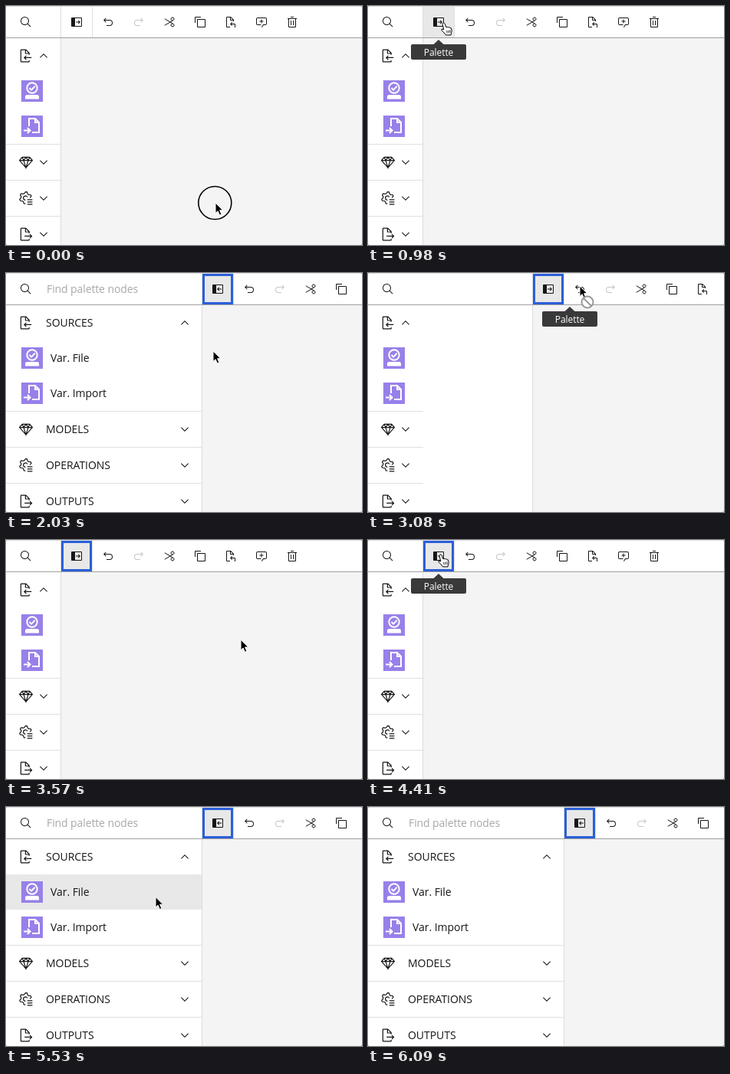
An HTML page for the animation above (6580 ms loop, 464x312 px).

```html
<!DOCTYPE html>
<html lang="en">
<head>
<meta charset="utf-8">
<title>Palette toggle</title>
<style>
  html, body { margin: 0; height: 100%; overflow: hidden; background: #999; }
  svg { display: block; width: 464px; height: 312px; border-radius: 3px; background: #fff; }
  text { font: 14px "Open Sans", "Noto Sans", sans-serif; letter-spacing: -.05px; fill: #161616; }
  path { fill-rule: evenodd; }
  .line { fill: none; stroke: #161616; stroke-width: 2; }
  .white { fill: none; stroke: #fff; stroke-width: 2; }
</style>
</head>
<body>
<svg id="stage" viewBox="0 0 464 312"></svg>
<script>
const LOOP = 6580, STEP = 70, SLIDE = 400;
const OPEN1 = 1070, CLOSE = 2958, OPEN2 = 4520, FOCUS = 1050;
const NARROW = 72, WIDE = 256;

// Icons on a 32 unit grid
const DOC = 'M24 14V10a1 1 0 0 0-.29-.71l-7-7A1 1 0 0 0 16 2H6A2 2 0 0 0 4 4V28a2 2 0 0 0 2 2H22a2 2 0 0 0 2-2V26H22v2H6V4h8v6a2 2 0 0 0 2 2h6v2Zm-8-4V4.41L21.59 10Z';
const PANEL = 'M28 4H4A2 2 0 0 0 2 6V26a2 2 0 0 0 2 2H28a2 2 0 0 0 2-2V6a2 2 0 0 0-2-2Zm0 22H12V6H28Z';
const ICON = {
  search: 'M29 27.6l-7.55-7.55a11 11 0 1 0-1.41 1.41L27.6 29ZM4 13a9 9 0 1 1 9 9A9 9 0 0 1 4 13Z',
  expand: PANEL + 'M14 15H22.2L19.6 12.4 21 11l5 5-5 5-1.4-1.4L22.2 17H14z',
  collapse: PANEL + 'M26 15H17.8l2.6-2.6L19 11l-5 5 5 5 1.4-1.4L17.8 17H26z',
  undo: 'M20 10H7.8l3.6-3.6L10 5 4 11l6 6 1.4-1.4L7.8 12H20a6 6 0 0 1 0 12H12v2h8a8 8 0 0 0 0-16Z',
  redo: 'M12 10H24.2l-3.6-3.6L22 5l6 6-6 6-1.4-1.4L24.2 12H12a6 6 0 0 0 0 12H20v2H12a8 8 0 0 1 0-16Z',
  cut: 'M3.5 7.5 24 19.4M3.5 24.5 24 12.6M24 4a4 4 0 1 0 .1 0ZM24 20a4 4 0 1 0 .1 0Z',
  copy: 'M9 9H29V29H9ZM3 18V3H18',
  paste: 'M26 20H17.8l2.6-2.6L19 16l-5 5 5 5 1.4-1.4L17.8 22H26v8h2V22a2 2 0 0 0-2-2ZM23.7 9.3l-7-7A1 1 0 0 0 16 2H6A2 2 0 0 0 4 4V28a2 2 0 0 0 2 2h8V28H6V4h8v6a2 2 0 0 0 2 2h6v2h2V10a1 1 0 0 0-.3-.7ZM16 4.4 21.6 10H16Z',
  comment: 'M17.7 30 16 29l4-7h6a2 2 0 0 0 2-2V8a2 2 0 0 0-2-2H6A2 2 0 0 0 4 8V20a2 2 0 0 0 2 2h9v2H6a4 4 0 0 1-4-4V8A4 4 0 0 1 6 4H26a4 4 0 0 1 4 4V20a4 4 0 0 1-4 4H21.2ZM17 9h-2v4h-4v2h4v4h2v-4h4v-2h-4z',
  trash: 'M12 12H14V24H12ZM18 12H20V24H18ZM4 6V8H6V28a2 2 0 0 0 2 2H24a2 2 0 0 0 2-2V8h2V6ZM8 28V8H24V28ZM12 2H20V4H12Z',
  input: DOC + 'M28 19H14.8l2.6-2.6L16 15l-5 5 5 5 1.4-1.4L14.8 21H28z',
  output: DOC + 'M13 21H26.2l-2.6 2.6L25 25l5-5-5-5-1.4 1.4L26.2 19H13z',
  gem: 'M8 5H24L30 12 16 28 2 12ZM2 12H30M8 5 11 12 16 28 21 12 24 5M11 12 16 5 21 12',
  gear: gearPath() + 'M19 13.5A4.5 4.5 0 1 0 15 20M19 19H30M19 24H30M19 29H30',
  up: 'M16 10 26 20 24.6 21.4 16 12.8 7.4 21.4 6 20Z',
  down: 'M16 22 6 12 7.4 10.6 16 19.2 24.6 10.6 26 12Z'
};

// Open outline of a six-toothed wheel, leaving room for the list lines
function gearPath() {
  let d = '';
  for (let i = 0; i < 19; i++) {
    const a = (90 + i * 15) * Math.PI / 180, r = i % 4 < 2 ? 13 : 9.6;
    d += (i ? 'L' : 'M') + (15 + r * Math.cos(a)).toFixed(1) + ' ' + (15 + r * Math.sin(a)).toFixed(1);
  }
  return d;
}

const icon = (name, x, y, size = .5, attrs = 'fill="#161616"') =>
  `<path d="${ICON[name]}" transform="translate(${x} ${y}) scale(${size}) translate(-16 -16)" ${attrs}/>`;
const rect = (x, y, w, h, fill, attrs = '') =>
  `<rect x="${x}" y="${y}" width="${w}" height="${h}" fill="${fill}" ${attrs}/>`;
const label = (x, y, s) => `<text x="${x}" y="${y}">${s}</text>`;
const LINE = 'class="line"';

const groups = [['SOURCES', 65, 'up'], ['MODELS', 204, 'down'], ['OPERATIONS', 251, 'down'], ['OUTPUTS', 298, 'down']];
const dividers = w => [180, 227, 274].map(y => rect(0, y, w, 1, '#e0e0e0')).join('');
const chevrons = x => groups.map(([, y, way]) => icon(way, x, y)).join('');

const paletteIcons =
  icon('search', 26, 21) + icon('input', 26, 65, .6) + icon('gem', 26, 204, .6, LINE) +
  icon('gear', 26, 251, .6, LINE) + icon('output', 26, 298, .6) +
  rect(20, 97, 28, 28, '#9880ea') + rect(20, 143, 28, 28, '#9880ea') +
  `<circle cx="34" cy="107" r="6.7" class="white"/><path d="M30.5 107l2.6 2.6 4.6-4.8" class="white"/>
   <path d="M25 121.5v-3q0-2.5 2.5-2.5h13q2.5 0 2.5 2.5v3z" fill="#fff"/>
   <path d="M30 157V147h8l5 5v13h-9M38 147v5h5" class="white" stroke-width="2.4"/>
   <path d="M23 162.5h8M28 159l3.5 3.5-3.5 3.5" class="white"/>`;

const tools =
  rect(0, 0, 400, 41, '#fff') + rect(40, 0, 1, 41, '#e0e0e0') +
  rect(0, 1, 40, 40, '#e8e8e8', 'id="shade"') +
  `<g id="expand">${icon('expand', 20, 21)}</g><g id="collapse">${icon('collapse', 20, 21)}</g>` +
  rect(1.5, 2.5, 37, 37, 'none', 'id="focus" stroke="#2a5fd8" stroke-width="3"') +
  icon('undo', 61, 21) + icon('redo', 101, 21, .5, 'fill="#c6c6c6"') +
  icon('cut', 141, 21, .5, LINE) + icon('copy', 181, 21, .5, LINE) + icon('paste', 221, 21) +
  icon('comment', 261, 21) + icon('trash', 301, 21);

const OUTLINE = 'stroke-width="1" stroke-linejoin="round"';
const cursors =
  `<path id="arrow" d="M0 0V13.5L3.1 10.7 5.4 16 7.9 14.9 5.6 9.7H9.8Z" fill="#000" stroke="#fff" ${OUTLINE}/>
   <g id="hand"><path d="M-2 1.5a1.6 1.6 0 0 1 3-.6l2 5 1.2-.6 1.4.6 1.3-.3 1.2 1 1.2.2.9 3.5-.6 2.4-.6 3.2H2.5L-.8 11.8-3.2 9.6l.6-1.6 2.4.8z" fill="#fff" stroke="#000" ${OUTLINE}/>
   <path d="M3.6 10l.6 3.4M5.8 9.6l.5 3.4M7.8 9.4l.4 3.2" stroke="#000" stroke-width=".8"/></g>
   <g id="beam" fill="none"><path d="M-3-7Q0-7 0-5V5Q0 7-3 7M3-7Q0-7 0-5M0 5Q0 7 3 7" stroke="#fff" stroke-width="3"/>
   <path d="M-3-7Q0-7 0-5V5Q0 7-3 7M3-7Q0-7 0-5M0 5Q0 7 3 7M-1.5 2H1.5" stroke="#000" stroke-width="1.3"/></g>
   <g id="barred" stroke="#999" stroke-width="2"><circle cx="10" cy="21" r="7.5" fill="#fff"/><path d="M4.8 15.8 15.2 26.2"/></g>
   <circle id="ring" cx="-.7" cy="0" r="21.5" fill="none" stroke="#000" stroke-width="1.6"/>`;

const byId = id => document.getElementById(id);
byId('stage').innerHTML =
  `<clipPath id="clip"><rect id="clipBox" height="312"/></clipPath>` +
  rect(0, 41, 464, 271, '#f4f4f4') +
  `<g clip-path="url(#clip)">${rect(0, 0, 256, 312, '#fff')}${rect(0, 0, 255, 46, '#e8e8e8', 'id="hover"')}
    ${paletteIcons}
    <g id="narrow">${dividers(NARROW)}${chevrons(49)}</g>
    <g id="wide">${dividers(WIDE)}${chevrons(233)}
      <text x="53" y="26" style="fill:#a8a8a8;letter-spacing:-.1px">Find palette nodes</text>
      ${groups.map(([s, y]) => label(52, y + 5, s)).join('')}
      ${label(58, 116, 'Var. File')}${label(58, 162, 'Var. Import')}</g>
  </g>
  <g id="tools">${tools}${rect(-1, 0, 1, 312, '#dcdcdc')}</g>` +
  rect(0, 41, 464, 1, '#a0a0a0') + rect(0, 0, 464, 1, '#e0e0e0') +
  `<g id="tip">${rect(-36, 50, 72, 20, '#393939', 'rx="2"')}<path d="M0 44 7 50.5H-7Z" fill="#393939"/>
    <text y="64.5" text-anchor="middle" style="font-size:12px;fill:#fff">Palette</text></g>
  <g id="cursor">${cursors}</g>`;

const el = {};
document.querySelectorAll('svg [id]').forEach(e => el[e.id] = e);
const show = (id, on) => el[id].style.display = on ? '' : 'none';
const place = (id, x, y) => el[id].setAttribute('transform', `translate(${x} ${y})`);

// Pointer path: time, x, y
const path = [
  [0, 273, 257], [350, 150, 190], [560, 30, 80], [700, 88, 42], [840, 99, 22], [980, 99, 22], [1470, 96, 20],
  [1610, 96, 20], [1820, 150, 80], [2030, 270, 102], [2170, 290, 70], [2310, 280, 24], [2450, 276, 17],
  [3360, 276, 17], [3640, 316, 168], [3850, 220, 110], [4060, 102, 30], [4410, 95, 19], [5040, 96, 20],
  [5250, 96, 20], [5460, 150, 90], [5740, 330, 200], [5950, 326, 274], [6020, 303, 296], [LOOP, 303, 296]
];
function pointer(t) {
  const i = path.findIndex(k => k[0] > t), [t0, x0, y0] = path[i - 1], [t1, x1, y1] = path[i];
  const u = (t - t0) / (t1 - t0);
  return [x0 + (x1 - x0) * u, y0 + (y1 - y0) * u];
}

function slide(t) {
  const u = Math.min(1, Math.max(0, t / SLIDE));
  return u * u * (3 - 2 * u);
}
function paletteWidth(t) {
  const p = t < CLOSE ? slide(t - OPEN1) : t < OPEN2 ? 1 - slide(t - CLOSE) : slide(t - OPEN2);
  return Math.round(NARROW + (WIDE - NARROW) * p);
}

function draw(t) {
  const w = paletteWidth(t), [x, y] = pointer(t);
  const wide = t >= OPEN1 && t < CLOSE || t >= OPEN2;
  const moving = w > NARROW && w < WIDE, opening = moving && wide, closing = moving && !wide;
  const over = !moving && y < 41 && x >= w && x < w + 40;
  const focused = t >= FOCUS;

  el.clipBox.setAttribute('width', w);
  place('tools', w, 0);
  show('wide', wide);
  show('narrow', !wide);
  show('collapse', wide);
  show('expand', !wide);
  show('focus', focused);
  show('shade', focused || over);

  const rowTop = [42, 88, 134, 181, 228, 275].filter(top => top <= y).pop();
  show('hover', w === WIDE && x < 255 && rowTop);
  if (rowTop) el.hover.setAttribute('y', rowTop);

  show('tip', over || opening || closing && t < CLOSE + 240);
  place('tip', opening ? NARROW + 20 : paletteWidth(closing ? t - 57 : t) + 20, 0);

  const kind = over || opening ? 'hand' : w === WIDE && x < w && y < 41 ? 'beam' : 'arrow';
  for (const k of ['arrow', 'hand', 'beam']) show(k, k === kind);
  show('barred', closing && t > 3060 && t < 3290);
  show('ring', t < STEP);
  show('cursor', t < 6090);
  place('cursor', x, y);
}

const start = performance.now();
function tick() {
  const t = (performance.now() - start) % LOOP;
  draw(Math.floor(t / STEP) * STEP);
  requestAnimationFrame(tick);
}
tick();
</script>
</body>
</html>
```
